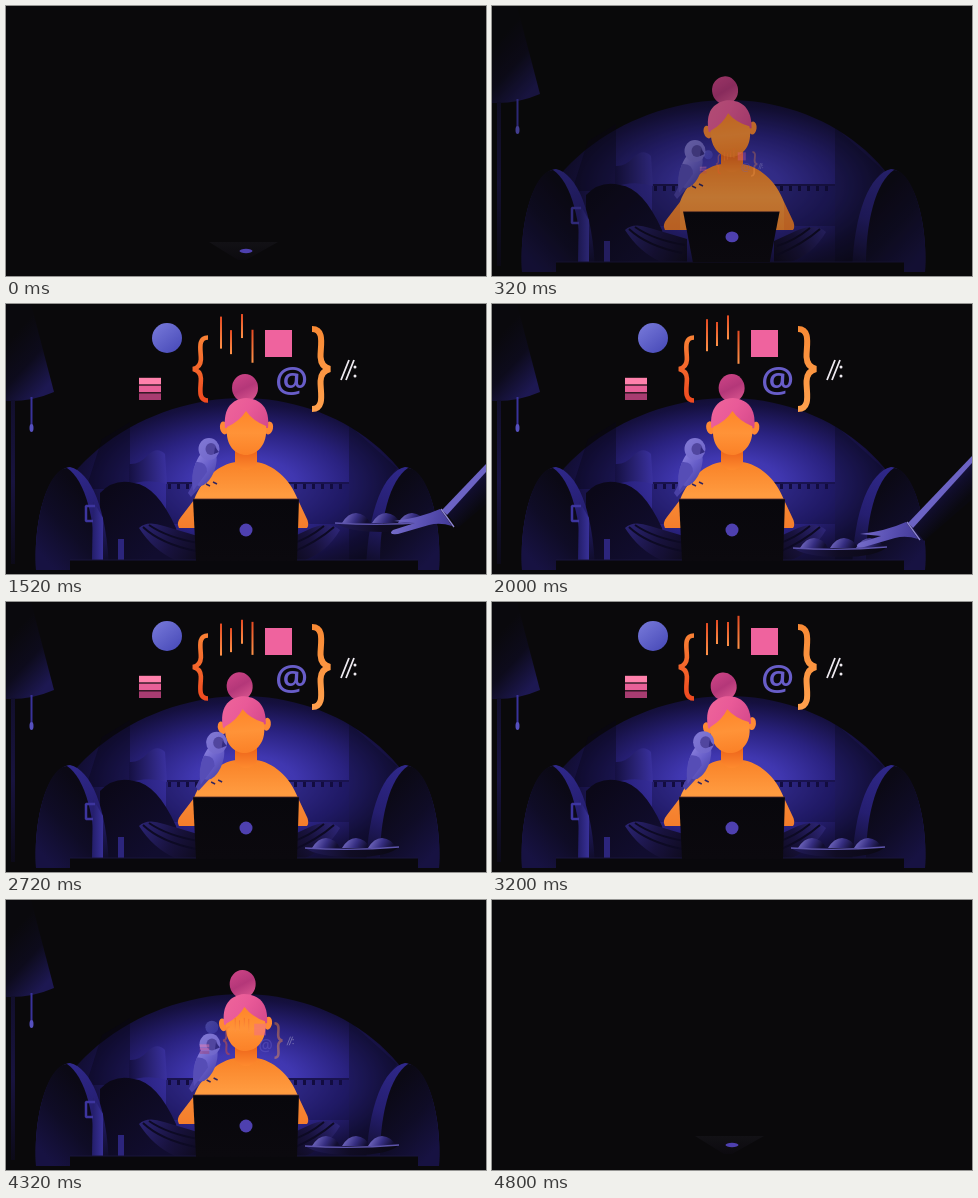
These frames come from a looping animation (480 by 270 pixels, 4.88 s). An HTML page with a canvas:

```html
<!DOCTYPE html>
<html lang="en">
<head>
<meta charset="utf-8">
<title>Late night coding</title>
<style>
html, body { margin: 0; width: 100%; height: 100%; overflow: hidden; background: #0a090b; }
canvas { display: block; width: 100vw; height: 100vh; }
</style>
</head>
<body>
<canvas id="stage" width="480" height="270"></canvas>
<script>
const ctx = document.getElementById('stage').getContext('2d');
const LOOP = 4880, STEP = 80;
const DARK = '#0a090b';

const lerp = (a, b, k) => a + (b - a) * k;

// Eased value between [time, value] keys.
function track(t, keys) {
  if (t <= keys[0][0]) return keys[0][1];
  for (let i = 1; i < keys.length; i++) {
    const [t0, a] = keys[i - 1], [t1, b] = keys[i];
    if (t <= t1) {
      const u = (t - t0) / (t1 - t0);
      return lerp(a, b, u * u * (3 - 2 * u));
    }
  }
  return keys[keys.length - 1][1];
}

function addStops(g, colors) {
  colors.forEach((c, i) => g.addColorStop(i / (colors.length - 1), c));
  return g;
}

const grad = (x0, y0, x1, y1, ...colors) =>
  addStops(ctx.createLinearGradient(x0, y0, x1, y1), colors);

const glow = (x, y, r, ...colors) =>
  addStops(ctx.createRadialGradient(x, y, 0, x, y, r), colors);

function fill(path, color) {
  ctx.fillStyle = color;
  ctx.fill(new Path2D(path));
}

function stroke(path, color, width) {
  ctx.strokeStyle = color;
  ctx.lineWidth = width;
  ctx.lineJoin = 'bevel';
  ctx.stroke(new Path2D(path));
}

function oval(x, y, rx, ry, color, turn = 0) {
  ctx.fillStyle = color;
  ctx.beginPath();
  ctx.ellipse(x, y, rx, ry, turn, 0, Math.PI * 2);
  ctx.fill();
}

function box(x, y, w, h, color) {
  ctx.fillStyle = color;
  ctx.fillRect(x, y, w, h);
}

function group(x, y, turn, draw) {
  ctx.save();
  ctx.translate(x, y);
  ctx.rotate(turn);
  draw();
  ctx.restore();
}

function chair() {
  fill('M30 266C27 215 42 165 64 163C85 168 101 205 103 266Z',
    grad(66, 164, 102, 262, '#2f288a', '#251e70', '#0e0b24'));
  fill('M30 266C27 215 42 165 61 164C79 176 90 215 89 266Z',
    grad(34, 250, 88, 200, '#171242', '#0f0c26', '#0b0915'));
}

function room() {
  box(0, 0, 480, 270, DARK);
  ctx.save();
  ctx.clip(new Path2D('M28 270C34 155 145 94 236 94C330 94 425 155 434 270Z'));
  ctx.translate(238, 180);
  ctx.scale(1, .52);
  oval(0, 0, 210, 210, glow(0, 0, 205, '#4940c0', '#4037b0', '#2a2280', '#15103f', '#0b0914'));
  ctx.restore();
  fill('M343 121L391 164Q372 185 362 256H343Z', 'rgba(9,7,24,.3)');
  fill('M96 135L124 118V185H80Z', 'rgba(9,7,24,.4)');
  box(160, 180, 183, 40, 'rgba(14,9,50,.35)');
  box(160, 178, 183, 2, '#19134f');
  for (let x = 162; x < 342; x += 9) box(x, 180, 3, 5, '#120c40');
  fill('M123 160Q133 161 142 151Q151 142 159 150L161 180Q140 174 123 181Z',
    grad(123, 0, 161, 0, '#151042', '#3a319f'));
  fill('M94 256V189Q108 174 128 179Q151 182 170 224L174 256Z',
    grad(105, 185, 160, 240, '#0b0818', '#110d2f'));
  chair();
  ctx.save();
  ctx.translate(463, 0);
  ctx.scale(-1, 1);
  chair();
  ctx.restore();
  fill('M87 197L97 214V256H86Z', grad(84, 0, 98, 0, '#1f1a60', '#3a329c'));
  stroke('M89 202H80V217H87', '#3d359f', 2.5);
  box(112, 235, 6, 21, '#2c257c');
}

function lamp() {
  fill('M0 0H25L48 88Q25 98 0 97Z', grad(4, 35, 48, 75, '#0a090d', '#0d0b1c', '#1d1852'));
  box(5, 96, 4, 164, grad(0, 95, 0, 260, '#120f2c', '#18133f', '#0c0a18'));
  box(24.5, 93, 2, 29, '#39329a');
  oval(25.5, 124, 2, 4, '#5650be');
}

function legs() {
  const wide = grad(134, 220, 200, 256, '#2b2474', '#18123d', '#0c0918');
  fill('M133 224Q141 216 158 222L195 233V256H169Q147 246 133 224Z', wide);
  fill('M334 226Q324 217 306 224L282 235V256H299Q321 248 334 226Z',
    grad(333, 220, 280, 256, '#2f277c', '#18123d', '#0c0918'));
  stroke('M137 223Q155 240 190 247M143 221Q162 234 193 239', '#0d0a24', 2);
  stroke('M328 223Q311 238 285 249M318 222Q302 235 285 240', '#0d0a24', 2);
}

function coder(tilt) {
  fill('M173 224Q170 219 175 213L188 196C196 174 214 160 230 158H250C266 160 284 174 292 196L300 213Q304 220 301 224Z',
    grad(0, 158, 0, 224, '#f98227', '#ff9b40', '#f98a30'));
  fill('M173 224Q170 219 175 213L188 196V224ZM301 224Q304 220 300 213L292 196V224Z',
    'rgba(226,89,28,.25)');
  fill('M229 143H251V160Q240 172 229 160Z', grad(0, 143, 0, 167, '#ea5d16', '#ff8d30'));
  group(240, 150, tilt, () => {
    ctx.translate(-240, -150);
    oval(239, 84, 13, 14, grad(232, 70, 246, 98, '#cb4385', '#b43779', '#d9558f'));
    oval(218, 124, 4, 6.5, '#ff8934', -.2);
    oval(263, 124, 4, 6.5, '#ff8934', .2);
    fill('M219 124C217 104 226 95 240 94C255 95 264 104 262 124Z',
      grad(220, 95, 260, 122, '#ee659a', '#e95a98', '#d64a8c'));
    fill('M221 123Q234 117 240 107Q247 117 260 122C262 142 250 151 240 151C230 151 219 142 221 123Z',
      grad(0, 107, 0, 151, '#ff8529', '#ff9338', '#fb8127'));
  });
}

function bird(lean) {
  group(lean * 9, -lean * 5, 0, () => {
    fill('M193 168L196 181L185 193L182 189Z', '#4a41a5');
    oval(199, 163, 10, 20, grad(188, 155, 211, 175, '#8a80dc', '#665dc8', '#4941a4'), .35);
    fill('M190 158Q201 157 201 168L187 187Q184 171 190 158Z', '#564db6');
    oval(203, 145, 10.5, 11, grad(194, 136, 213, 155, '#8178d4', '#6e64c9'));
    oval(205, 145, 5.5, 6, '#51469f');
    fill('M209 143L213 148L208 150Z', '#342b81');
  });
  stroke(`M${200 + lean * 6} 180l4 2m3 -4l4 2`, '#30255f', 1.5);
}

function plate(x, y) {
  group(x, y, 0, () => {
    for (const cx of [-27, 3, 29])
      fill(`M${cx - 14} 2Q${cx - 8} -8 ${cx} -8Q${cx + 10} -7 ${cx + 14} 2Z`,
        grad(cx - 9, -7, cx + 9, 3, '#6a61b8', '#352d80', '#120e30'));
    fill('M-48 2Q0 4 46 1Q36 11 0 11Q-35 11 -48 2Z', grad(-45, 0, 40, 8, '#211b58', '#100c24', '#0b0915'));
    stroke('M-48 2Q0 5 46 1', '#5d54ab', 1.3);
  });
}

function arm(x, y) {
  group(x, y, 0, () => {
    fill('M418 219L500 133V178L432 237Z', grad(430, 195, 452, 217, '#1c1756', '#100d2a', '#0a0910'));
    fill('M416 219L500 131V137L421 224Z', '#6c63c4');
    fill('M368 230Q394 227 414 218L426 235Q414 231 403 234L372 243Q361 244 367 239L389 232Z',
      grad(370, 225, 422, 238, '#746bc8', '#5b52b5', '#453c9a'));
    stroke('M415 218L428 236', '#8f87d4', 1.3);
  });
}

function brace(x, y, w, h, side, color, width) {
  const hw = w / 2 * side, hh = h / 2;
  group(x, y, 0, () => {
    stroke(`M${hw} ${-hh}C${-hw * .5} ${-hh} ${hw * .1} ${-hh * .55} ${hw * .05} ${-hh * .3}
      Q0 ${-hh * .05} ${-hw} 0Q0 ${hh * .05} ${hw * .05} ${hh * .3}
      C${hw * .1} ${hh * .55} ${-hw * .5} ${hh} ${hw} ${hh}`, color, width);
  });
}

// Vertical swing of a bar that is highest at time `at`.
const swing = (t, mid, reach, at, pace) => mid - reach * Math.cos((t - at) / pace);

function bar(x, y, length) {
  box(x, y, 2, length, grad(0, y, 0, y + length, '#e54a22', '#ff9349'));
}

function symbols(t, out) {
  const settle = track(t, [[720, 1], [1200, 0]]);
  ctx.save();
  ctx.translate(240, 198);
  ctx.scale(out, out);
  ctx.translate(-240, -198);
  ctx.globalAlpha = out;

  oval(161, 34, 15, 15, grad(150, 20, 173, 48, '#7577d8', '#484ab8'));
  box(259, 26, 27, 27, '#ef639e');
  brace(194.5, 65, 15, 63, 1, grad(0, -32, 0, 32, '#f98035', '#ef4a20'), 4.6);
  group(315, 65, settle * .05, () =>
    brace(0, 0, 18, 80, -1, grad(0, -41, 0, 41, '#f98a35', '#ffa04d'), 6));

  ['#ff81ac', '#e86098', '#a83c71'].forEach((c, i) =>
    group(144, 77 + i * 7.8, settle * -.02, () => box(-11, -3.2, 22, 6.6, c)));

  ctx.fillStyle = '#685dc8';
  ctx.font = '600 37px "Open Sans", sans-serif';
  ctx.textAlign = 'center';
  ctx.textBaseline = 'alphabetic';
  ctx.fillText('@', 285.5, 88.5);

  group(343 - settle * 7, 66 + settle * 6, settle * -.08, () => {
    stroke('M-8 10L0 -10M-3 10L5 -10', '#eeeaf0', 1.8);
    oval(6, -3, 1.5, 1.5, '#eeeaf0');
    oval(6, 6, 1.5, 1.5, '#eeeaf0');
  });

  bar(214, swing(t, 17.3, 4.7, 1500, 450), 32);
  bar(224, swing(t, 22.5, 4.5, 800, 191), 24);
  bar(235, swing(t, 15, 5, 1600, 520), 24);
  bar(245.5, swing(t, 19, 8, 3710, 590), 33);
  ctx.restore();
}

function laptop(open) {
  const top = lerp(236, 195, open);
  const left = lerp(203, 187, open), right = lerp(272, 293, open);
  const footL = lerp(232, 190, open), footR = lerp(240, 291, open);
  fill(`M${left} ${top}H${right}L${footR} ${lerp(254, 257, open)}H${footL}Z`,
    grad(0, top, 0, 257, open < .3 ? '#121115' : '#08070c', '#0b090e'));
  if (open > .1) stroke(`M${left} ${top}H${right}`, `rgba(81,43,43,${open})`, .8);
  oval(240, lerp(245, 226, open), 6.5, lerp(2.2, 6.5, open), '#4e40af');
}

function draw(t) {
  const open = track(t, [[0, 0], [480, 1], [4320, 1], [4800, 0]]);
  const out = track(t, [[160, 0], [600, 1], [4080, 1], [4520, 0]]);
  const tilt = track(t, [[560, -.09], [800, -.08], [1440, 0], [2080, .01],
    [2640, -.08], [3600, -.13], [4080, -.1], [4480, 0]]);
  const lean = track(t, [[2080, 0], [2640, .85], [3500, 1], [4000, 1], [4400, 0]]);

  room();
  lamp();
  coder(tilt);
  bird(lean);
  legs();
  box(64, 256, 348, 14, '#09080c');
  stroke('M64 256H412', '#19143a', 1);

  if (t >= 1040) {
    plate(track(t, [[1040, 535], [1520, 377], [2000, 349], [2160, 347]]),
      track(t, [[1040, 190], [1520, 217], [2000, 242], [2160, 244]]));
  }
  if (t >= 1040 && t < 2640) {
    arm(track(t, [[1040, 150], [1520, 20], [2000, 0], [2120, 0], [2600, 130]]),
      track(t, [[1040, -40], [1520, -13], [2000, 0], [2120, 0], [2600, -65]]));
  }

  ctx.globalAlpha = 1 - open;
  box(0, 0, 480, 270, DARK);
  ctx.globalAlpha = 1;
  if (out > 0) symbols(t, out);
  laptop(open);
}

const start = performance.now();
function tick() {
  const t = (performance.now() - start) % LOOP;
  draw(Math.floor(t / STEP) * STEP);
  requestAnimationFrame(tick);
}
tick();
</script>
</body>
</html>
```
